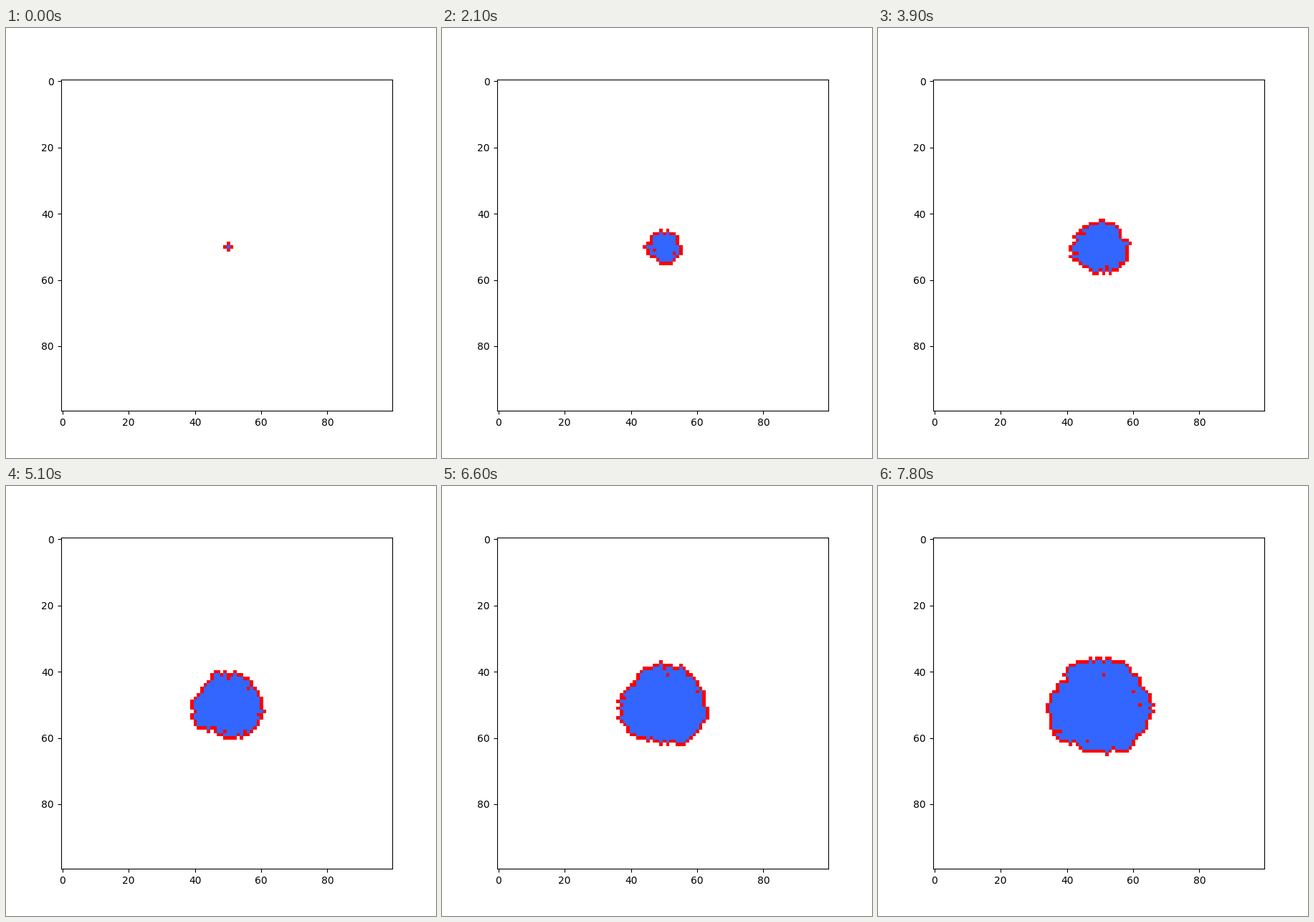
Write a matplotlib script that moves like this. It is 600 by 600 pixels and loops after 8000 ms.

```python
import numpy as np
import matplotlib.pyplot as plt
from matplotlib.animation import FuncAnimation

SIZE, CENTRE = 100, 50
STEPS, TICKS_PER_STEP, TICKS, TICK_MS = 27, 3, 80, 100
WHITE, BLUE, RED = (255, 255, 255), (51, 102, 255), (255, 0, 0)

START_RADIUS, SPEED = 0.6, 0.54  # in cells, and cells per step
# Relative reach every 30 degrees, clockwise from the right.
LOBES = [1.02, 1.03, 1.03, 0.93, 0.94, 1.12, 1.06, 0.91, 1.01, 0.92, 0.96, 0.94]
ROUGHNESS = 0.6
SLOW_SHARE, SLOW_DELAY = 0.04, 4

row, col = np.mgrid[:SIZE, :SIZE] - CENTRE
distance = np.hypot(row, col)
bearing = np.degrees(np.arctan2(row, col)) % 360
lobe = np.interp(bearing, np.arange(0, 361, 30), LOBES + LOBES[:1])


def neighbours(mask):
    """Cells that share a side with the mask."""
    return np.any([np.roll(mask, shift, axis)
                   for axis in (0, 1) for shift in (-1, 1)], axis=0)


def resistance():
    """Random delay of each cell; a few cells keep glowing for long."""
    rng = np.random.default_rng(4)
    rough = rng.normal(0, ROUGHNESS, distance.shape)
    slow = rng.random(distance.shape) < SLOW_SHARE
    return rough + slow * rng.exponential(SLOW_DELAY, distance.shape)


def paint(burnt, glowing):
    image = np.full((SIZE, SIZE, 3), WHITE, np.uint8)
    image[glowing] = RED
    image[burnt] = BLUE
    return image


def grow():
    """Each step, glowing cells within the advancing edge burn out."""
    cost = distance / lobe + resistance()
    burnt = distance == 0
    images = []
    for step in range(STEPS):
        if step:
            burnt = burnt | (neighbours(burnt) & (cost < START_RADIUS + SPEED * step))
        images.append(paint(burnt, neighbours(burnt)))
    return images


images = grow()
fig, ax = plt.subplots(figsize=(6, 6), dpi=100)
picture = ax.imshow(images[0], interpolation="nearest")


def update(tick):
    picture.set_data(images[min(tick // TICKS_PER_STEP, STEPS - 1)])
    return [picture]


animation = FuncAnimation(fig, update, frames=TICKS, interval=TICK_MS,
                          repeat=True, repeat_delay=0)
plt.show()
```
